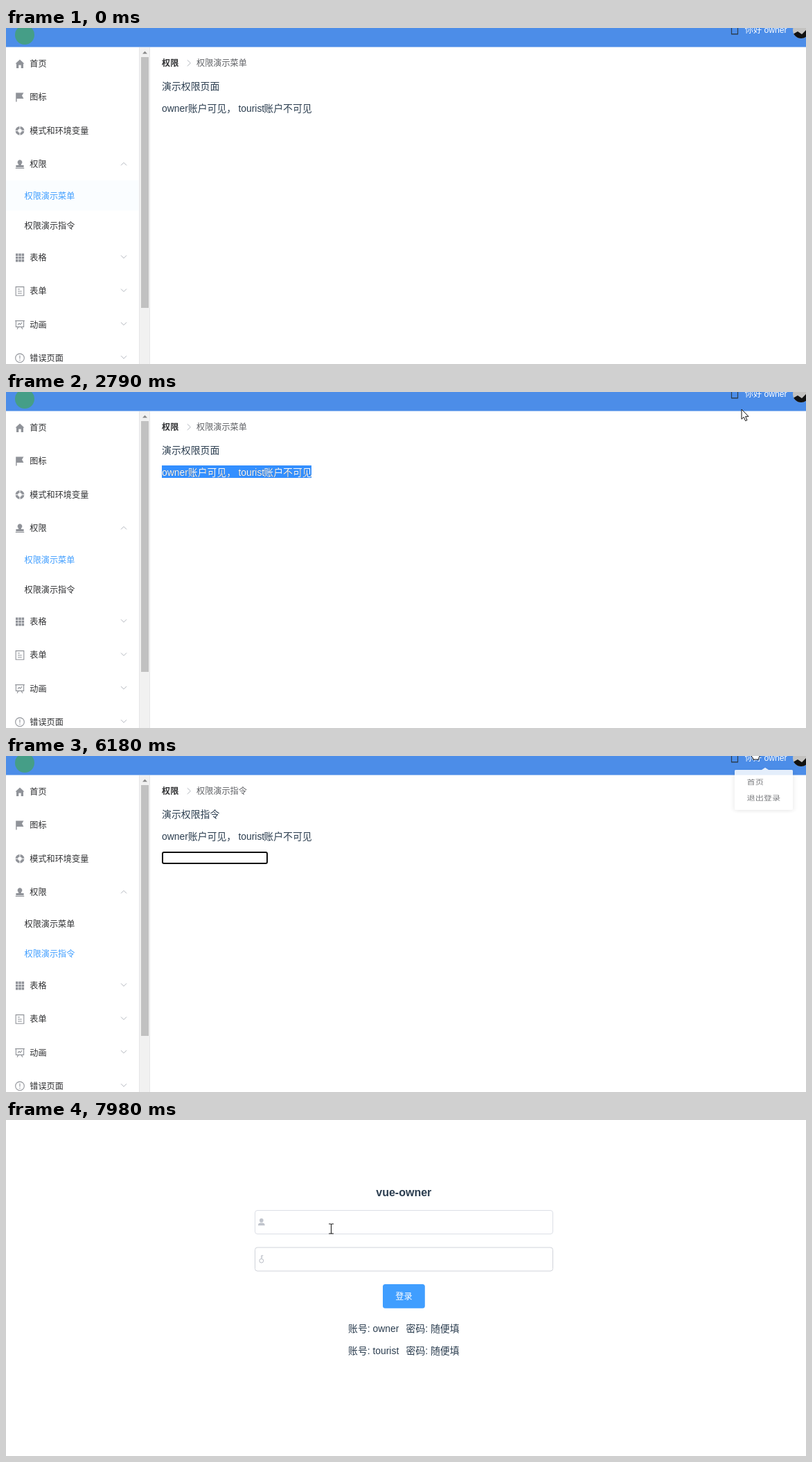
Animation of 1155 by 485 pixels, one loop 8000 ms. Source, as an HTML page:

```html
<!DOCTYPE html>
<html lang="zh-CN">
<head>
<meta charset="utf-8">
<title>Permission demo</title>
<style>
html, body { margin: 0; width: 100%; height: 100%; overflow: hidden; background: #fff; }
svg { display: block; font-family: "Liberation Sans", "Noto Sans CJK SC", "Noto Sans CJK", sans-serif; }
text { white-space: pre; }
.s { font-size: 12.15px; fill: #303133; }
.m { font-size: 13.88px; fill: #2c3e50; }
.icon { fill: #909399; }
.line { fill: none; stroke: #909399; stroke-width: 1.1; }
.chev { fill: none; stroke: #b4b8bf; stroke-width: 1; }
</style>
</head>
<body>
<svg width="1155" height="485" viewBox="0 0 1155 485">
  <defs>
    <clipPath id="selClip"><rect id="selClipBox" x="225" y="106" width="0" height="18"/></clipPath>
    <clipPath id="faceClip"><circle cx="1148" cy="3" r="12"/></clipPath>
    <filter id="shadow" x="-30%" y="-30%" width="160%" height="170%">
      <feDropShadow dx="0" dy="2" stdDeviation="4" flood-color="#000" flood-opacity=".12"/>
    </filter>
  </defs>

  <g id="app">
    <rect width="1155" height="27.5" fill="#4c8de8"/>
    <circle cx="27" cy="10" r="14" fill="#459e87"/>
    <path d="M1047.5-4V8.5H1056.5V-4M1047 8.8H1057" fill="none" stroke="#2c3e50" stroke-width="1.2"/>
    <g id="hello"></g>
    <g clip-path="url(#faceClip)">
      <rect x="1136" y="-9" width="24" height="24" fill="#c3c2c0"/>
      <path d="M1136 9L1143 5L1149 9L1155 3V16H1136Z" fill="#111"/>
    </g>

    <rect id="hover1" y="220" width="191.5" height="43.5" fill="#ecf5ff"/>
    <rect id="hover2" y="263.5" width="191.5" height="43.5" fill="#ecf5ff"/>
    <g id="side"></g>
    <g class="icon">
      <path d="M20 45.5L26.5 51.5H25V58H21.7V53.5H18.3V58H15V51.5H13.5Z"/>
      <path d="M14.2 93.5H25.5L23 97.5L25.5 102H15.6V106.5H14.2Z"/>
      <circle cx="20" cy="148.3" r="4.6" fill="none" stroke="#909399" stroke-width="3.6"/>
      <path d="M20 141.5V145.5M20 151V155M13.2 148.3H17.2M22.8 148.3H26.8" stroke="#fff" stroke-width="1.1"/>
      <path d="M20 190.3A3.5 3.5 0 0 1 22 196.6V198H25.6V201H14.4V198H18V196.6A3.5 3.5 0 0 1 20 190.3ZM13.8 201.8H26.2V203H13.8Z"/>
      <g id="grid"></g>
    </g>
    <g class="line">
      <path d="M14.2 373.6H25.8V386.2H14.2ZM17 377H20M17 380H22.8M17 383H22.8"/>
      <path d="M13.2 422.6H26.8M14.4 422.6V431.4H25.6V422.6M17 428.6L19 426.3L20.8 428L23.2 425.2M18 431.4L16 434.6M22 431.4L24 434.6"/>
      <circle cx="20" cy="476.4" r="6.3"/>
      <path d="M20 472.6V477.6M20 478.8V480.2"/>
    </g>
    <g id="chevs"></g>

    <rect x="193" y="28" width="14.5" height="457" fill="#f1f1f1"/>
    <path d="M192.5 28V485M207.5 28V485" stroke="#e6e6e8"/>
    <rect x="195" y="42" width="11" height="362" fill="#c1c1c1"/>
    <path d="M197 37.2H204L200.5 33.5Z" fill="#8a8a8a"/>

    <g id="main"></g>
    <path class="chev" d="M261.8 46.3L266.4 50.6L261.8 55"/>
    <rect id="sel" x="225" y="106" width="0" height="18" fill="#338fff"/>
    <g id="note"></g>
    <g id="noteSel" clip-path="url(#selClip)"></g>
    <g id="field">
      <rect id="box" fill="#fff"/>
      <path id="caret" d="M229.5 141V154" stroke="#111"/>
    </g>

    <g id="menu">
      <path d="M1052 22a2 2 0 0 1 2-2H1091L1096 15.5L1101 20H1134a2 2 0 0 1 2 2V98a2 2 0 0 1-2 2H1054a2 2 0 0 1-2-2Z" fill="#fff" filter="url(#shadow)"/>
      <rect id="menuHover" x="1052" width="84" height="31.4" fill="#ecf5ff"/>
      <g id="menuText"></g>
    </g>
  </g>

  <g id="login">
    <g id="loginText"></g>
    <rect x="359.5" y="130.5" width="430" height="34" rx="3.5" fill="none" stroke="#dcdfe6"/>
    <rect id="password" x="359.5" y="184" width="430" height="34" rx="3.5" fill="none"/>
    <g fill="#c0c4cc">
      <circle cx="368.8" cy="144.9" r="2.8"/>
      <path d="M364 152.3V151A3 3 0 0 1 367 148.4H370.6A3 3 0 0 1 373.6 151V152.3Z"/>
    </g>
    <path d="M368.8 200V195.6H371.3M368.8 197.8H370.6" fill="none" stroke="#b9bdc5"/>
    <circle cx="368.8" cy="203.2" r="2.9" fill="none" stroke="#b9bdc5"/>
    <rect x="544" y="237" width="60.8" height="34.8" rx="3.5" fill="#409eff"/>
    <g id="button"></g>
  </g>

  <circle id="press" r="10.5" fill="#fff200" fill-opacity=".6"/>
  <g id="cursor">
    <path id="arrow" d="M0 0V14.2L3.2 11.2L5.6 16.6L8 15.6L5.6 10.3H10Z" fill="#fff" stroke="#111"/>
    <path id="beam" d="M-3.5-7H-1Q0-7 0-6Q0-7 1-7H3.5M0-6V6M-3.5 7H-1Q0 7 0 6Q0 7 1 7H3.5" fill="none" stroke="#222" stroke-width="1.1"/>
    <path id="hand" d="M-1.4 1.2Q0-1 1.4 1.2V6.5Q3 5 4.3 7Q6 5.6 7 7.8Q9.2 6.6 9.6 9.2V13.5L7.8 16.5V19H-.6V17L-5.2 11.4Q-5.4 8.6-3 9.6L-1.4 11.4ZM1.4 6.5V10M4.3 7V10M7 7.8V10.4" fill="#fff" stroke="#111"/>
  </g>
</svg>

<script>
const LOOP = 8000, STEP = 77.4, LEAD = 20;
const HOST = "owner", GUEST = "tourist";

const el = id => document.getElementById(id);
const set = (id, attrs) => { for (const k in attrs) el(id).setAttribute(k, attrs[k]); };
const show = (id, on) => set(id, { visibility: on ? "inherit" : "hidden" });

function add(parent, tag, attrs, content = "") {
  const node = document.createElementNS("http://www.w3.org/2000/svg", tag);
  for (const k in attrs) node.setAttribute(k, attrs[k]);
  node.textContent = content;
  el(parent).append(node);
  return node;
}
// Text placed by its left edge and the middle of its glyphs
const label = (parent, x, mid, str, cls = "s", style = "") =>
  add(parent, "text", { x, y: mid + (cls === "m" ? 5 : 4.6), class: cls, style }, str);

const ramp = (t, from, to) => Math.min(1, Math.max(0, (t - from) / (to - from)));
const smooth = f => f * f * (3 - 2 * f);
const grow = (t, from) => 1 - (1 - ramp(t, from, from + 300)) ** 4;
const inside = (x, y, l, t, r, b) => x >= l && x <= r && y >= t && y <= b;

// Sidebar
const rowY = i => 51.5 + i * 48.3;
["首页", "图标", "模式和环境变量", "权限"].forEach((s, i) => label("side", 34.3, rowY(i), s));
["表格", "表单", "动画", "错误页面"].forEach((s, i) => {
  const y = 331.3 + i * 48.3;
  label("side", 34.3, y, s);
  add("chevs", "path", { class: "chev", d: `M166 ${y - 3}l4 4l4 -4` });
});
add("chevs", "path", { class: "chev", d: "M166 198.3l4 -4l4 4" });
const item1 = label("side", 26.5, 242.2, "权限演示菜单");
const item2 = label("side", 26.5, 285.5, "权限演示指令");
for (let i = 0; i < 9; i++)
  add("grid", "rect", { x: 14 + i % 3 * 4.3, y: 325.5 + Math.floor(i / 3) * 4.3, width: 3.5, height: 3.5 });

// Page
label("hello", 1066.8, 2.6, "你好 " + HOST, "s", "fill:#fff");
label("main", 225, 50.6, "权限", "s", "font-weight:700");
const crumb = label("main", 275, 50.6, "", "s", "fill:#606266");
const heading = label("main", 225, 84, "", "m");
for (const [g, style] of [["note", ""], ["noteSel", "fill:#fff"]]) {
  label(g, 225, 116, HOST, "m", style);
  label(g, 262.8, 116, "账户可见，", "m", style);
  label(g, 335.4, 116, GUEST, "m", style);
  label(g, 372.3, 116, "账户不可见", "m", style);
}
const menuItems = ["首页", "退出登录"].map((s, i) => label("menuText", 1069.5, 44.7 + i * 31.4, s));

// Login
add("loginText", "text", { x: 574.3, y: 110.3, "text-anchor": "middle",
  style: "font-size:16px;font-weight:700;fill:#2c3e50" }, "vue-" + HOST);
[HOST, GUEST].forEach((name, i) => {
  label("loginText", 494, 301 + i * 32, "账号: " + name, "m");
  label("loginText", 577.5, 301 + i * 32, "密码: 随便填", "m");
});
label("button", 562.3, 254.6, "登录", "s", "fill:#fff");

// Pointer moves: start and end time, then where it arrives
const moves = [
  [0, 850, 229, 119],
  [1145, 1870, 449, 121],
  [2130, 2785, 1062, 25],
  [2785, 3100, 1072, -14],
  [3410, 4100, 62, 281],
  [4335, 4560, 350.5, 193.5],
  [4560, 5030, 425, 166],
  [5030, 5800, 1130, 2],
  [5800, 5950, 1079, -14],
  [6340, 6820, 1085.5, 72],
  [7050, 7890, 470, 207],
  [7890, 7970, 469.5, 157]
];
function pointer(t) {
  let x = 900, y = 466;
  for (const [from, to, px, py] of moves) {
    const f = smooth(ramp(t, from, to));
    x += (px - x) * f;
    y += (py - y) * f;
  }
  return [x, y];
}
function shapeAt(x, y, out, open) {
  if (out) return inside(x, y, 359, 130, 790, 218) ? "beam" : "arrow";
  if (x < 192 || inside(x, y, 1066, -20, 1155, 10)) return "hand";
  if (open && inside(x, y, 1052, 20, 1136, 100)) return "hand";
  return inside(x, y, 225, 106, 460, 126) ? "beam" : "arrow";
}

function draw(ms) {
  const t = Math.floor((ms + LEAD) / STEP) * STEP;
  const [x, y] = pointer(t);
  const second = t > 4400, out = t > 7180, focus = t < 6960;
  const open = Math.max(grow(t, 3330) - grow(t, 3690), grow(t, 6110) - grow(t, 7090));

  el("app").style.display = out ? "none" : "";
  el("login").style.display = out ? "" : "none";

  set("hover1", { opacity: .25 * (1 - ramp(t, 0, 150)) });
  set("hover2", { opacity: ramp(t, 3950, 4200) - ramp(t, 4420, 4720) });
  item1.style.fill = second ? "#303133" : "#409eff";
  item2.style.fill = second ? "#409eff" : "#303133";
  crumb.textContent = second ? "权限演示指令" : "权限演示菜单";
  heading.textContent = second ? "演示权限指令" : "演示权限页面";

  const width = t < 1300 || t > 4240 ? 0 : t > 1900 ? 216 : Math.min(216, x - 225);
  set("sel", { width });
  set("selClipBox", { width });

  show("field", second);
  const w = focus ? 2 : 1;
  set("box", { x: 225 + w / 2, y: 138 + w / 2, width: 153 - w, height: 18 - w,
    rx: w, stroke: focus ? "#101010" : "#767676", "stroke-width": w });
  show("caret", second && focus && (t + 540) % 1000 < 500);

  show("menu", open > 0);
  set("menu", { opacity: Math.sqrt(open), transform: `translate(0 ${20 - 20 * open}) scale(1 ${open})` });
  const row = inside(x, y, 1052, 29, 1136, 91.8) ? Math.floor((y - 29) / 31.4) : -1;
  show("menuHover", open > 0 && row >= 0);
  set("menuHover", { y: 29 + row * 31.4 });
  menuItems.forEach((m, i) => m.style.fill = i === row ? "#66b1ff" : "#606266");

  set("password", { stroke: t > 7890 ? "#d0d3da" : "#dcdfe6" });

  const shape = t > 0 ? shapeAt(x, y, out, open > 0) : "";
  for (const s of ["arrow", "beam", "hand"]) show(s, s === shape);
  set("cursor", { transform: `translate(${x} ${y})` });
  show("press", [[1080, 1870], [4240, 4350], [6960, 7050]].some(([a, b]) => t > a && t < b));
  set("press", { cx: x - 2, cy: y });
}

const start = performance.now();
function tick() {
  draw((performance.now() - start) % LOOP);
  requestAnimationFrame(tick);
}
tick();
</script>
</body>
</html>
```
